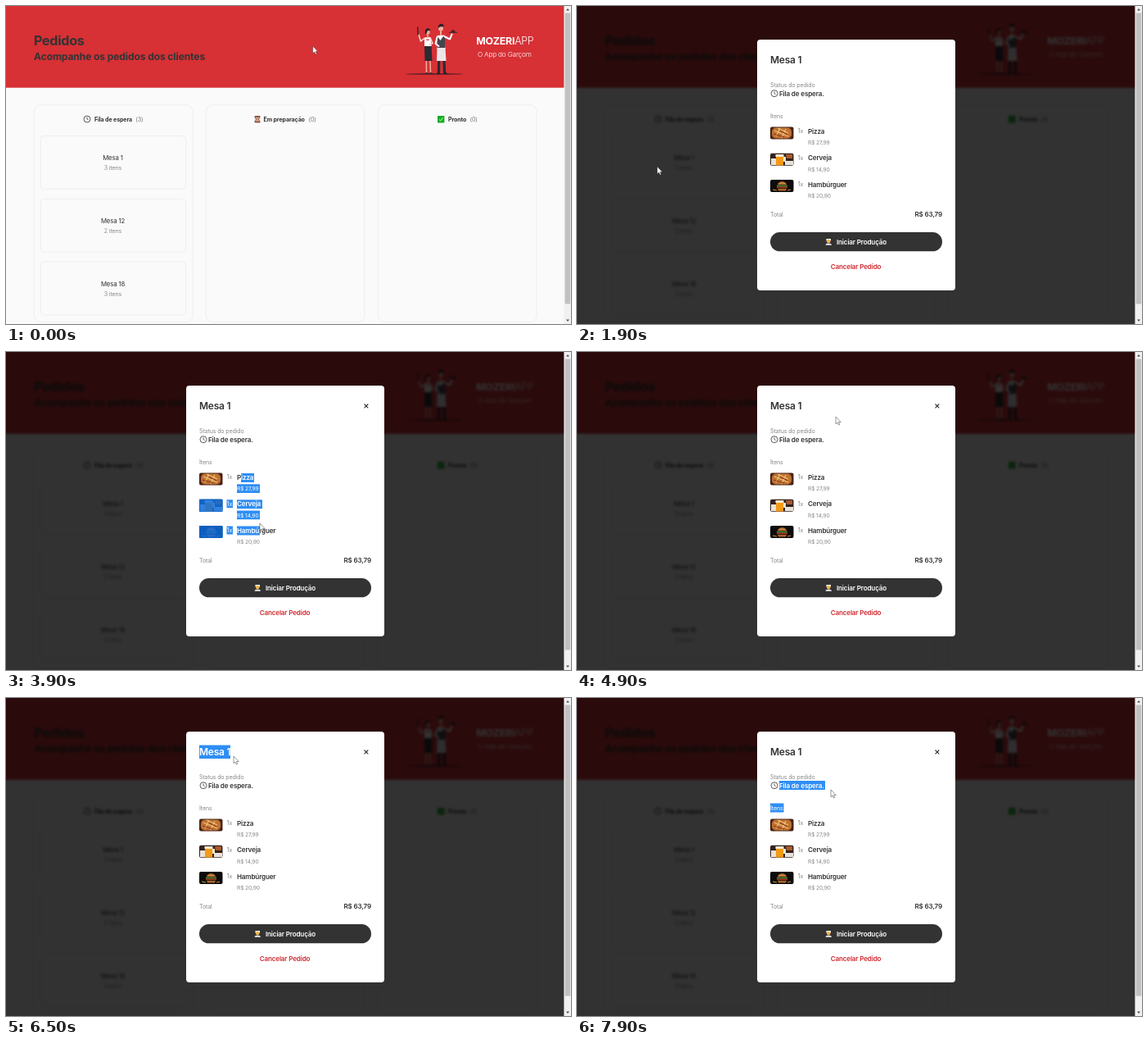
These frames come from a looping animation (690 by 388 pixels, 8000 ms). An HTML page:

```html
<!DOCTYPE html>
<html lang="pt-BR">
<head>
<meta charset="utf-8">
<title>Pedidos</title>
<style>
  html, body { margin: 0; height: 100%; overflow: hidden; background: #fafafa; }
  svg { display: block; width: 100vw; height: 100vh; }
  text { font: 400 7.1px Inter, sans-serif; letter-spacing: -.02em; fill: var(--ink, #333); }
  .h1 { font-size: 16.2px; font-weight: 650; }
  .h2 { font-size: 12.1px; font-weight: 650; letter-spacing: -.01em; }
  .title { font-size: 12px; font-weight: 600; }
  .strong { font-size: 8.1px; font-weight: 600; }
  .label { font-weight: 650; }
  .table { font-size: 7.8px; }
  .muted { fill: var(--ink, #888); }
  .price { font-size: 6.7px; }
  .white { fill: #fff; }
  .red { fill: #d02a30; }
  .brand { font-size: 12.4px; }
  .tagline { font-size: 8.2px; font-weight: 300; }
  .mid { text-anchor: middle; }
  .end { text-anchor: end; }
  .box { fill: none; stroke: #ebebeb; stroke-width: .8; }
  .line { fill: none; stroke: #333; stroke-width: .8; }
  .blurred { filter: blur(1.6px); }
</style>
</head>
<body>
<svg viewBox="0 0 690 388">
  <defs>
    <clipPath id="selection"></clipPath>
    <g id="clock" class="line"><circle r="4"/><path d="M0-2.3V0l1.6 .9"/></g>
  </defs>

  <g id="page">
    <rect x="-20" y="-20" width="730" height="430" fill="#fafafa"/>
    <rect x="-20" y="-20" width="730" height="119.700" fill="#d73035"/>
    <text class="h1" x="34" y="48">Pedidos</text>
    <text class="h2" x="34" y="65.500">Acompanhe os pedidos dos clientes</text>

    <g id="waiters" stroke-linecap="round" stroke-linejoin="round" fill="none">
      <ellipse cx="523" cy="83" rx="35" ry="1" fill="#6f2328"/>
      <path d="M513.300 66l.2 15M517.800 66l.7 15" stroke="#eeb09a" stroke-width="1.600"/>
      <path d="M511 49h8.500l1 18h-9z" fill="#2b2a33"/>
      <path d="M511 38.500l7.500-.5 1 11h-8.500z" fill="#fff"/>
      <path d="M511 39.500l-4.500 3.500-2.500-8M518.500 39.500l2.500 6-4 2" stroke="#f4d6cb" stroke-width="1.600"/>
      <path d="M503.300 35l-.6-9" stroke="#4a2027" stroke-width="1.500"/>
      <path d="M515 35v3" stroke="#eeb09a" stroke-width="1.600"/>
      <circle cx="515" cy="32" r="2.700" fill="#eeb09a"/>
      <path d="M512 34c-1.500-7 5-9 6.500-4-3-1-4.500 0-5 4z" fill="#2b2026"/>
      <path d="M513.500 40.500l3 1.500M516.500 40.500l-3 1.500" stroke="#d73035" stroke-width=".8"/>
      <path d="M513 82h1.500M518 82h2" stroke="#2b2a33" stroke-width="1.300"/>
      <path d="M529 52l-.5 29M534.500 52l1 29" stroke="#2b2a33" stroke-width="3.200"/>
      <path d="M526.500 36l9-.5 1 17h-10z" fill="#fff"/>
      <path d="M527 37l3.500 5 3.500-5 2 1 .5 13h-10z" fill="#454550"/>
      <path d="M526.500 51h10l1 16h-11.500z" fill="#ece6e6"/>
      <path d="M526.500 38l-2 8 4 3M536 37.500l6 3 2.500-6" stroke="#fff" stroke-width="2"/>
      <path d="M541.500 32.500h9" stroke="#2b2a33" stroke-width=".8"/>
      <path d="M543.300 32a2.700 2.700 0 0 1 5.400 0z" fill="#4a2327"/>
      <path d="M531 31v4" stroke="#eeb09a" stroke-width="2"/>
      <circle cx="531" cy="27.500" r="3" fill="#eeb09a"/>
      <path d="M527.800 27c-.5-6 6.500-7 7-2l-4.500 .3z" fill="#2b2026"/>
      <path d="M527 82.300h2M535.500 82.300h2.500" stroke="#1e1d25" stroke-width="1.500"/>
    </g>
    <text class="brand white end" x="644.300" y="47">
      <tspan font-weight="700">MOZERI</tspan><tspan style="font-weight:300">APP</tspan>
    </text>
    <text class="tagline white mid" x="608.800" y="61.800">O App do Garçom</text>

    <g id="columns"></g>
    <use href="#clock" x="99" y="138"/>
    <g id="hourglass">
      <path d="M304 135h6v2l-2 1.200 2 1.500v2h-6v-2l2-1.500-2-1.200z" fill="#c99a7c" stroke="#8a5a48" stroke-width=".7"/>
      <path d="M303.700 134.700h6.600M303.700 141.700h6.600" stroke="#7d4232" stroke-width="1.300"/>
    </g>
    <rect x="527" y="134" width="8.400" height="8.400" rx=".5" fill="#17ad24"/>
    <path d="M529 138.300l1.600 1.800 3-4" class="line" style="stroke:#fff"/>
  </g>

  <g id="modal">
    <rect width="690" height="388" opacity=".8"/>
    <rect x="220" y="41" width="242" height="306" rx="4" fill="#fff"/>
    <path id="close" class="line" style="stroke-width:1.1" d="M437.500 63.500l4.800 4.800M442.300 63.500l-4.800 4.800"/>
    <use href="#clock" x="241" y="106.700"/>
    <g id="photos">
      <g>
        <rect x="236" y="147.500" width="28.500" height="15" rx="2" fill="#4a2415"/>
        <rect x="238" y="148.500" width="24" height="13" rx="5" fill="#bf7233"/>
        <path d="M241 152l17 7M245 149l13 6M243 159l5-10M250 161l5-11" stroke="#f0c27a" stroke-width="1.100"/>
        <path d="M240 156l13 4M248 152l9 5" stroke="#8c3518"/>
      </g>
      <g>
        <rect x="236" y="179.800" width="28.500" height="15" rx="2" fill="#34221c"/>
        <path d="M237 186h8v8h-8zM254 189h10v5h-10z" fill="#e9e2da"/>
        <path d="M243 183h9v11.500h-9z" fill="#f39a16"/>
        <path d="M242.500 181h10v3h-10zM252 184h3v6h-3z" fill="#f7ead0"/>
        <path d="M255 181h8v5h-7z" fill="#a65a2e"/>
      </g>
      <g>
        <rect x="236" y="212" width="28.500" height="15" rx="2" fill="#0d0b0b"/>
        <path d="M245 218c1-5 10-5 11 0z" fill="#c07a36"/>
        <path d="M244 219.500h13" stroke="#5f9a38" stroke-width="1.500"/>
        <path d="M244 221.500h13" stroke="#b53a24" stroke-width="1.500"/>
        <path d="M245 223h11l-1 2.500h-9z" fill="#a9642d"/>
        <path d="M239 224l5 1M257 225l4-1" stroke="#c9993f"/>
      </g>
    </g>
    <g id="words">
      <text class="title" x="236" y="70">Mesa 1</text>
      <text class="muted" x="236" y="98.800">Status do pedido</text>
      <text class="strong" x="247" y="109.500">Fila de espera.</text>
      <text class="muted" x="236" y="137">Itens</text>
      <g id="items"></g>
    </g>
    <text class="muted" x="236" y="257">Total</text>
    <text class="strong end" x="446" y="257">R$ 63,79</text>
    <rect x="236" y="276" width="210" height="23.300" rx="11.650" fill="#333"/>
    <g id="cook">
      <path d="M304.500 286.500v-2.500h5.500v2.500z" fill="#fff"/>
      <circle cx="307.200" cy="287" r="2.300" fill="#f2b64c"/>
      <path d="M303.500 291.700c0-3 7.500-3 7.500 0z" fill="#eee"/>
    </g>
    <text class="strong white" x="317" y="290.500">Iniciar Produção</text>
    <text class="strong red mid" x="340.500" y="321">Cancelar Pedido</text>
    <g clip-path="url(#selection)">
      <rect width="690" height="388" fill="#2f8ef4"/>
      <rect x="236" y="147" width="28.500" height="80" fill="#0f6fe0"/>
      <use href="#photos" opacity=".15"/>
      <use href="#words" style="--ink:#fff"/>
    </g>
  </g>

  <rect x="681.400" width="9" height="388" fill="#f1f1f1"/>
  <rect x="682.600" y="8.500" width="6.600" height="355" fill="#c1c1c1"/>
  <path d="M684 5.500l2-2.500 2 2.500zM684 382.500l2 2.500 2-2.500z" fill="#505050"/>
  <path id="cursor" d="M0 0V8.800L2 7l1.400 3 1.400-.6L3.500 6.500H6.200Z" fill="#fff" stroke="#333" stroke-width=".5"/>
</svg>

<script>
const $ = id => document.getElementById(id);
const LOOP = 8000, STEP = 100;
const OPEN_AT = 1900;

const columns = [
  { x: 34, title: 'Fila de espera', titleX: 108, count: 3, countX: 158.3 },
  { x: 244, title: 'Em preparação', titleX: 314.5, count: 0, countX: 369.5 },
  { x: 454, title: 'Pronto', titleX: 540, count: 0, countX: 566.5 },
];
const orders = [['Mesa 1', 3], ['Mesa 12', 2], ['Mesa 18', 3]];
const items = [['Pizza', '27,99', 21], ['Cerveja', '14,90', 31], ['Hambúrguer', '20,90', 49]];
const ROW = 32.3;

$('columns').innerHTML = columns.map(c => `
  <rect class="box" x="${c.x + .3}" y="120.700" width="193.700" height="265" rx="8"/>
  <text class="label" x="${c.titleX}" y="140.500">${c.title}</text>
  <text style="fill:#777" x="${c.countX}" y="140.500">(${c.count})</text>`).join('') +
  orders.map(([table, count], i) => `
  <g transform="translate(0 ${i * 76.8})">
    <rect class="box" x="42.300" y="158.500" width="177.300" height="64.800" rx="4"/>
    <text class="table mid" x="130.500" y="188.300">${table}</text>
    <text class="muted mid" x="130.500" y="200.200">${count} itens</text>
  </g>`).join('');

$('items').innerHTML = items.map(([name, price], i) => `
  <g transform="translate(0 ${i * ROW})">
    <text class="muted" x="269.800" y="155.300">1x</text>
    <text class="strong" x="282" y="156.200">${name}</text>
    <text class="muted price" x="282" y="169.300">R$ ${price}</text>
  </g>`).join('');

// Selectable boxes in reading order: x, y, width, height
const runs = [[236, 57.5, 38, 16.5], [236, 91, 55, 10], [247, 101, 56, 11], [236, 128.5, 16.5, 11]];
items.forEach(([, , width], i) => {
  const y = i * ROW;
  runs.push([236, 147.5 + y, 28.5, 15], [269.5, 148 + y, 7.5, 10],
            [282, 148 + y, width, 11], [282, 161.3 + y, 28, 10.7]);
});

// Each drag lists the last run reached at every step
const drags = [
  { at: 3600, from: 6, x: 287, to: [6, 7, 10, 14, 14, 15, 14, 10, 7] },
  { at: 5700, from: 0, x: 236, to: Array(9).fill(0) },
  { at: 7600, from: 2, x: 247, to: [2, 2, 2, 3] },
];

// Pointer path: time, x, y
const path = [
  [0, 374.700, 49], [400, 374.700, 49], [600, 270, 120], [800, 110, 240], [900, 48, 276], [1100, 98, 196],
  [1900, 98, 196], [2300, 200, 185], [2700, 300, 215], [3000, 345, 300], [3400, 287, 152],
  [3600, 292, 153], [3900, 310, 209], [4100, 345, 238], [4400, 330, 140], [4900, 316, 79],
  [5300, 335, 110], [5700, 236, 64], [6200, 285, 66], [6500, 278, 71], [6700, 281, 82],
  [7100, 252, 98], [7200, 252, 98], [7400, 248, 100], [7500, 248, 100], [7900, 310, 112], [8000, 310, 112],
];

function pointer(t) {
  const i = path.findIndex(p => p[0] > t);
  const [t0, x0, y0] = path[i - 1], [t1, x1, y1] = path[i];
  const k = (t - t0) / (t1 - t0);
  return [x0 + (x1 - x0) * k, y0 + (y1 - y0) * k];
}

function selected(t, cursorX) {
  const drag = drags.find(d => t >= d.at && t < d.at + d.to.length * STEP);
  if (!drag) return '';
  const last = drag.to[(t - drag.at) / STEP];
  return runs.slice(drag.from, last + 1).map(([x, y, w, h], i) => {
    const run = drag.from + i;
    const left = run === drag.from ? drag.x : x;
    const right = run === last ? Math.min(Math.max(cursorX, left), x + w) : x + w;
    return `<rect x="${left}" y="${y}" width="${right - left}" height="${h}"/>`;
  }).join('');
}

function draw(now) {
  const t = Math.floor(now % LOOP / STEP) * STEP;
  const [x, y] = pointer(t);
  const open = t >= OPEN_AT;
  $('page').classList.toggle('blurred', open);
  $('modal').style.display = open ? '' : 'none';
  $('close').style.display = t > OPEN_AT ? '' : 'none';
  $('cursor').setAttribute('transform', `translate(${x} ${y})`);
  $('selection').innerHTML = selected(t, x);
}

const start = performance.now();
(function tick() {
  draw(performance.now() - start);
  requestAnimationFrame(tick);
})();
</script>
</body>
</html>
```
